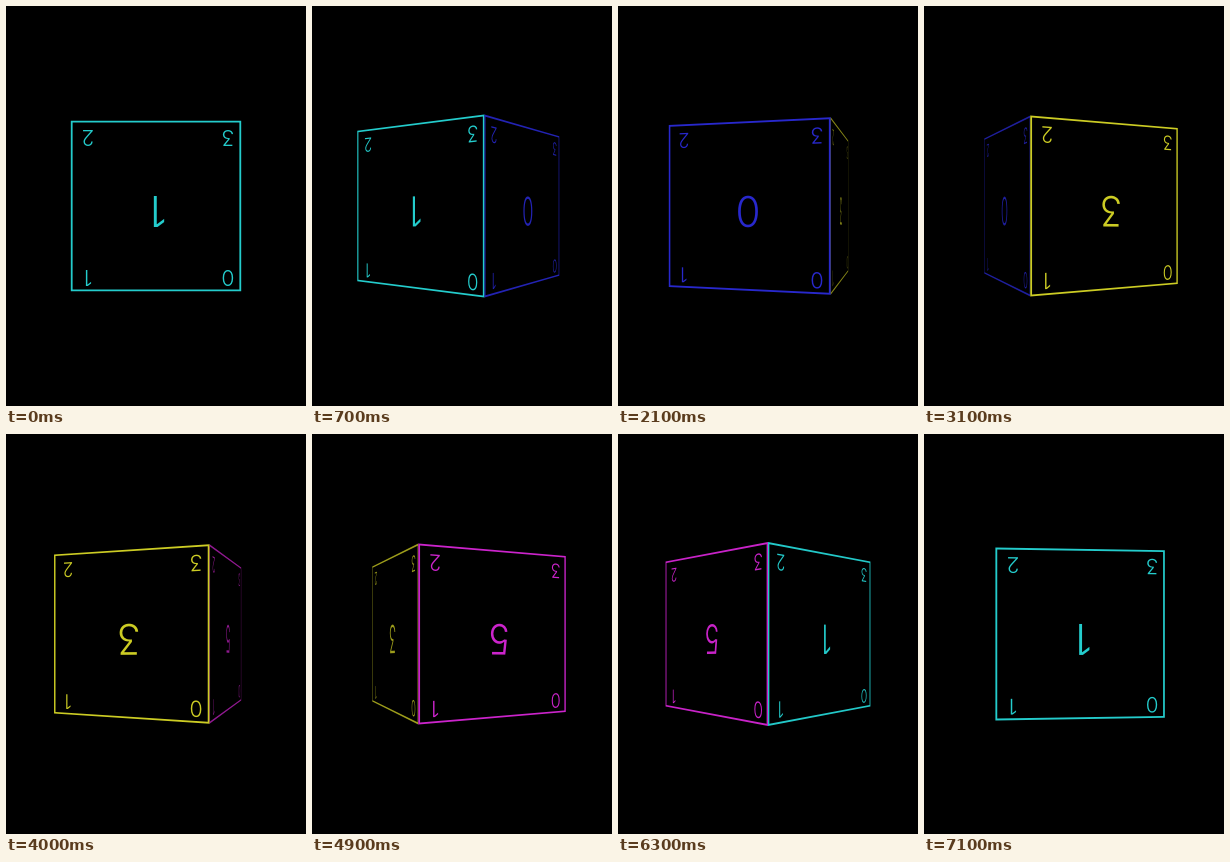
An HTML page that plays this animation: 300x400 px, repeating every 7200 ms.

```html
<!DOCTYPE html>
<html lang="en">
<head>
<meta charset="utf-8">
<title>Turning cube</title>
<style>
html, body { margin: 0; width: 100%; height: 100%; overflow: hidden; background: #000; }
svg { display: block; width: 100vw; height: 100vh; }
text {
  font-family: Inter, Roboto, sans-serif;
  font-weight: 300;
  font-feature-settings: "cv09";
  text-anchor: middle;
}
</style>
</head>
<body>
<svg id="stage" viewBox="0 0 300 400"></svg>
<script>
const NS = "http://www.w3.org/2000/svg";
const LOOP = 7200, STEP = 100;
const FOCAL = 482.8, DIST = 6.667;      // camera, in units of half the cube's edge
const FRONT = FOCAL / (DIST - 1);       // half the face in px when it faces the viewer
const LINE = 1.8;

const stage = document.getElementById("stage");

function add(parent, tag, attrs) {
  const el = document.createElementNS(NS, tag);
  for (const name in attrs) el.setAttribute(name, attrs[name]);
  return parent.appendChild(el);
}

function makeFace([digit, color], index) {
  const group = add(stage, "g", { fill: color });
  const border = add(group, "path", { "fill-rule": "evenodd" });
  const labels = [];
  const label = (str, x, y, size) => {
    const el = add(group, "text", { "font-size": size });
    el.textContent = str;
    labels.push({ el, u: x / FRONT, v: y / FRONT });
  };
  label(digit, 2, -10, 42.6);
  label("0", 72, 64, 21.4);
  label("1", -68, 64, 21.4);
  label("2", -68, -76, 21.4);
  label("3", 72, -76, 21.4);
  return { group, border, labels, turn: index * Math.PI / 2 };
}

const faces = [
  ["1", "#24cccc"],
  ["0", "#2828cc"],
  ["3", "#cccc24"],
  ["5", "#cc24cc"]
].map(makeFace);

// Face point (u, v) in -1..1 to the stage, with the local scale
function project(u, v, angle) {
  const c = Math.cos(angle), s = Math.sin(angle);
  const X = u * c + s;
  const k = FOCAL / (DIST - (c - u * s));
  const dk = -k * k * s / FOCAL;
  return { x: 150 + k * X, y: 200 + k * v, xu: k * c + X * dk, yu: v * dk, yv: k };
}

function quad(h, angle) {
  const pts = [[-h, -h], [h, -h], [h, h], [-h, h]].map(([u, v]) => {
    const p = project(u, v, angle);
    return p.x.toFixed(3) + " " + p.y.toFixed(3);
  });
  return "M" + pts.join("L") + "Z";
}

function drawFace(face, spin) {
  const angle = face.turn - spin;
  const facing = Math.cos(angle);
  const visible = facing > 1 / DIST;
  face.group.setAttribute("display", visible ? "inline" : "none");
  if (!visible) return;
  face.group.setAttribute("opacity", Math.min(1, 0.45 + 0.75 * facing));
  face.border.setAttribute("d", quad(1, angle) + quad(1 - LINE / FRONT, angle));
  for (const { el, u, v } of face.labels) {
    const p = project(u, v, angle);
    // the lettering stands on its head
    const m = [-p.xu / FRONT, -p.yu / FRONT, 0, -p.yv / FRONT, p.x, p.y];
    el.setAttribute("transform", "matrix(" + m.map(n => n.toFixed(5)).join(" ") + ")");
  }
}

function draw(ms) {
  const t = Math.floor((ms % LOOP) / STEP) * STEP;
  const spin = t / LOOP * 2 * Math.PI;
  faces.forEach(face => drawFace(face, spin));
}

const start = performance.now();
function tick() {
  draw(performance.now() - start);
  requestAnimationFrame(tick);
}
tick();
</script>
</body>
</html>
```
